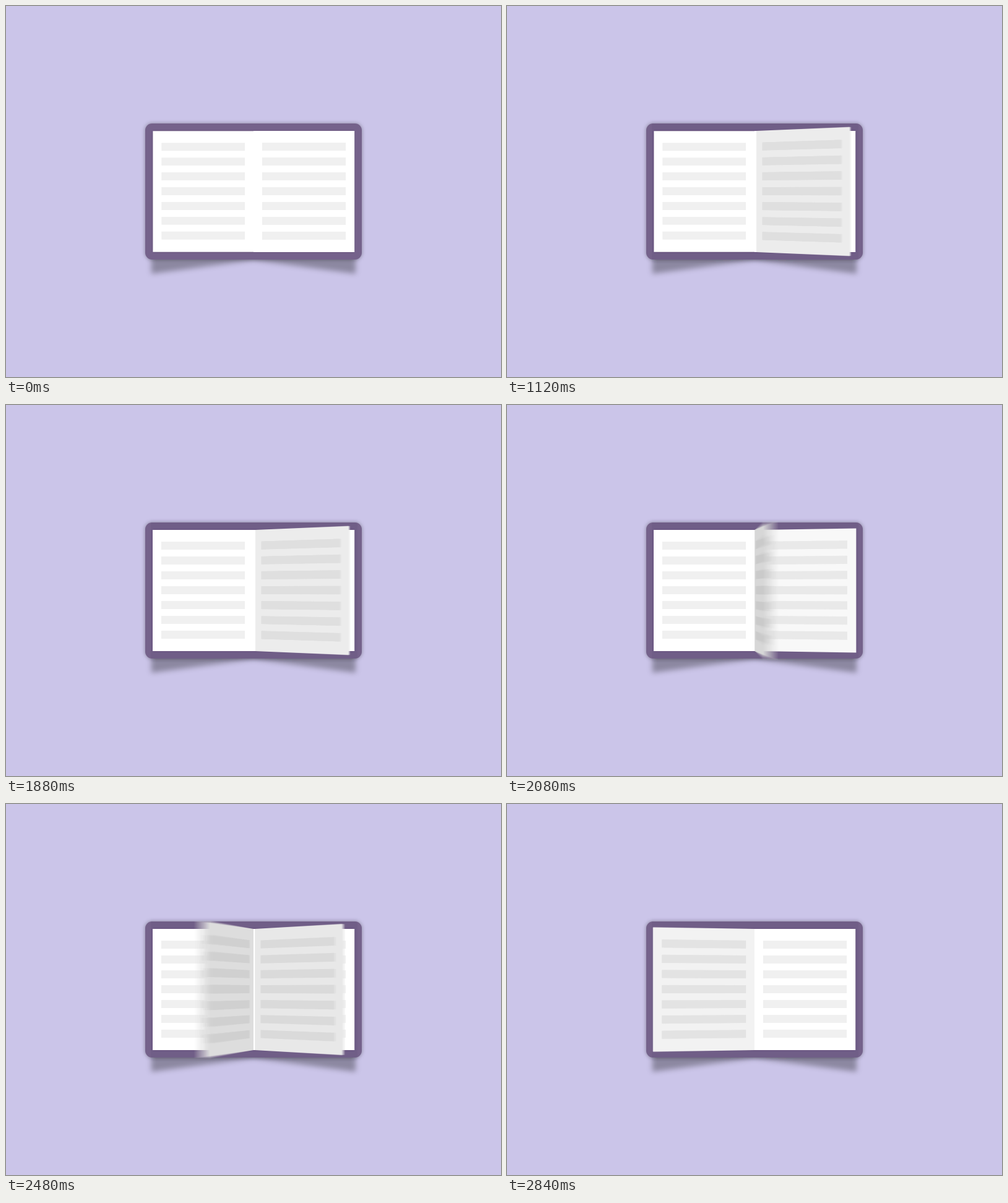
Animation, 800 px wide and 600 px high, one loop 2880 ms. Source, as an HTML page with a canvas:

```html
<!DOCTYPE html>
<html lang="en">
<head>
<meta charset="utf-8">
<title>Book</title>
<style>
  html, body { margin: 0; width: 100%; height: 100%; overflow: hidden; background: #cbc5e9; }
  canvas { display: block; width: 800px; height: 600px; }
</style>
</head>
<body>
<canvas id="stage" width="800" height="600"></canvas>
<script>
const W = 800, H = 600, CX = 400, CY = 300;
const LOOP = 2880, STEP = 40, SHUTTER = 20, SAMPLES = 16;
const DEPTH = 1200, PAGE_W = 163, PAGE_H = 98, LIFT = 1.5;
const STARTS = [770, 1530, 1850, 2090], FLIP = 825;

const makeLayer = () => {
  const c = document.createElement('canvas');
  c.width = W;
  c.height = H;
  return c.getContext('2d', { alpha: false });
};
const main = document.getElementById('stage').getContext('2d', { alpha: false });
const back = makeLayer();
const scratch = makeLayer();

// Cubic Bezier easing with control points (x1, 0) and (x2, 1)
function ease(u, x1 = 0.73, x2 = 0.78) {
  if (u <= 0) return 0;
  if (u >= 1) return 1;
  let lo = 0, hi = 1, t = 0.5;
  for (let i = 0; i < 24; i++) {
    t = (lo + hi) / 2;
    const v = 1 - t;
    if (3 * v * v * t * x1 + 3 * v * t * t * x2 + t * t * t < u) lo = t;
    else hi = t;
  }
  return t * t * (3 - 2 * t);
}

function project(r, y, angle, lift) {
  const s = DEPTH / (DEPTH - r * Math.sin(angle) - lift);
  return [CX + r * Math.cos(angle) * s, CY + y * s];
}

function quad(ctx, r0, r1, y0, y1, angle, lift, fill) {
  ctx.beginPath();
  for (const [r, y] of [[r0, y0], [r1, y0], [r1, y1], [r0, y1]]) {
    ctx.lineTo(...project(r, y, angle, lift));
  }
  ctx.closePath();
  ctx.fillStyle = fill;
  ctx.fill();
}

const gray = v => `rgb(${v},${v},${v})`;

function drawPage(ctx, angle, lift = 0, from = 0, shade = 0) {
  const light = 1 - shade;
  quad(ctx, from, PAGE_W, -PAGE_H, PAGE_H, angle, lift, gray(255 * light));
  for (let i = 0; i < 7; i++) {
    const y = -79 + i * 24;
    quad(ctx, Math.max(14, from), 149, y, y + 13, angle, lift, gray(240 * light));
  }
}

function shadeAt(angle) {
  if (angle < Math.PI / 2) return 0.155 * Math.sin(angle);
  return 0.155 * Math.pow((Math.PI - angle) / (Math.PI / 2), 0.53);
}

function drawTurning(ctx, angle) {
  if (angle <= 0) return;
  // The raised right stack hides the part next to the spine
  const from = angle < Math.PI / 2 ? LIFT / Math.sin(angle) : 0;
  if (from < PAGE_W) drawPage(ctx, angle, 0, from, shadeAt(angle));
}

function drawBack(ctx) {
  ctx.fillStyle = '#cbc5e9';
  ctx.fillRect(0, 0, W, H);

  ctx.save();
  ctx.filter = 'blur(4px)';
  ctx.fillStyle = 'rgba(0,0,0,0.31)';
  ctx.beginPath();
  for (const [x, y] of [[235, 380], [235, 433], [400, 411], [565, 433], [565, 380]]) ctx.lineTo(x, y);
  ctx.fill();
  ctx.restore();

  ctx.save();
  ctx.shadowColor = 'rgba(0,0,0,0.35)';
  ctx.shadowBlur = 6;
  ctx.fillStyle = '#75628b';
  ctx.beginPath();
  ctx.roundRect(225, 190, 350, 220, 11);
  ctx.fill();
  ctx.shadowColor = 'rgba(0,0,0,0.2)';
  ctx.shadowBlur = 4;
  ctx.fillStyle = '#fff';
  ctx.fillRect(238, 203, 324, 194);
  ctx.restore();

  drawPage(ctx, Math.PI, -3);
  drawPage(ctx, 0, LIFT);
}

function drawMoment(ctx, time) {
  ctx.drawImage(back.canvas, 0, 0);
  const angles = STARTS.map(s => Math.PI * ease((time - s) / FLIP));
  const isLeft = a => a > Math.PI / 2;
  angles.filter(a => !isLeft(a)).reverse().forEach(a => drawTurning(ctx, a));
  angles.filter(isLeft).forEach(a => drawTurning(ctx, a));
}

// Average several moments to get motion blur
function render(time) {
  main.globalAlpha = 1;
  main.drawImage(back.canvas, 0, 0);
  if (time < 720) return;
  for (let i = 0; i < SAMPLES; i++) {
    drawMoment(scratch, time + SHUTTER * ((i + 0.5) / SAMPLES - 0.5));
    main.globalAlpha = 1 / (i + 1);
    main.drawImage(scratch.canvas, 234, 184, 334, 232, 234, 184, 334, 232);
  }
}

drawBack(back);
const origin = performance.now();
let shown = -1;

function tick() {
  const time = Math.floor(((performance.now() - origin) % LOOP) / STEP) * STEP;
  if (time !== shown) {
    shown = time;
    render(time);
  }
  requestAnimationFrame(tick);
}
tick();
</script>
</body>
</html>
```
